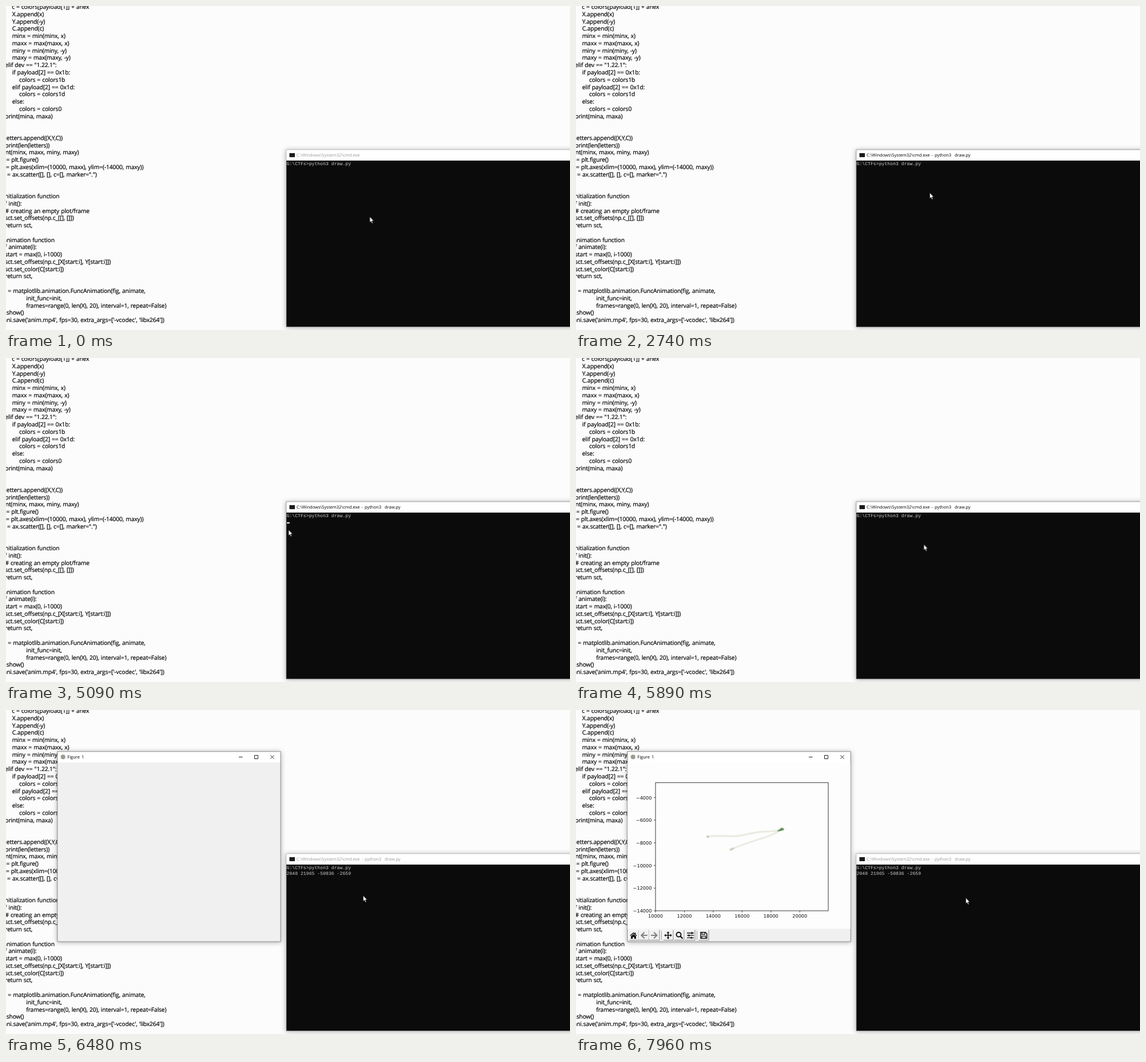
Recreate the animation shown at these times as an HTML page. Size 986x568 px, loop 8 s.

```html
<!DOCTYPE html>
<html lang="en">
<head>
<meta charset="utf-8">
<title>Terminal and plot</title>
<style>
html, body { margin: 0; width: 100%; height: 100%; overflow: hidden; background: #fcfcfd; }
body { position: relative; text-rendering: geometricPrecision; }
pre {
  position: absolute; left: -14px; top: -3.9px; margin: 0; color: #000;
  font: 10.3px/12.766px "Open Sans", "Noto Sans", sans-serif;
  letter-spacing: -.14px; word-spacing: .55px;
  -webkit-text-stroke: .2px #000;
}
svg { position: absolute; left: 0; top: 0; }
.bar { font: 7.55px "Open Sans", sans-serif; word-spacing: 1px; }
.con { font: 8.17px "Liberation Mono", monospace; fill: #ccc; }
.tick { font: 8.2px "DejaVu Sans", sans-serif; fill: #111; }
.win { filter: drop-shadow(0 1px 4px rgba(0, 0, 0, .32)); }
.line { fill: none; stroke: #222; }
.trail { fill: none; stroke: #ecebe3; stroke-width: 3.4; stroke-linecap: round; stroke-dasharray: 1 2; }

/* hard changes */
.step { animation: 8s step-end infinite; }
#frame { animation-name: frame; }
#title { animation-name: title; }
#suffix { animation-name: suffix; }
#caret { animation-name: caret; }
#output { animation-name: output; }
#figure { animation-name: figure; }
#plot { animation-name: plot; }
#arrow { animation-name: arrow; }
#beam { animation-name: beam; }
#tip { animation-name: tip; }
@keyframes frame { 0% { fill: #b4b4b4 } 9.125% { fill: #8a8a8a } 78.125%, 100% { fill: #b4b4b4 } }
@keyframes title { 0% { fill: #999 } 9.125% { fill: #000 } 78.125%, 100% { fill: #999 } }
@keyframes suffix { 0% { visibility: hidden } 26.375%, 100% { visibility: visible } }
@keyframes caret {
  0% { opacity: 0; transform: translate(603px, 279px) }
  9.125% { opacity: 1; transform: translate(603px, 279px) }
  15.75% { opacity: 0; transform: translate(603px, 279px) }
  22.625% { opacity: 1; transform: translate(603px, 279px) }
  26.375%, 35.625%, 48.875%, 62.625% { opacity: 1; transform: translate(490.5px, 288px) }
  29%, 42.25%, 55.5%, 69.25%, 100% { opacity: 0; transform: translate(490.5px, 288px) }
}
@keyframes output { 0% { opacity: 0 } 76.125%, 100% { opacity: 1 } }
@keyframes figure { 0% { opacity: 0 } 78.125%, 100% { opacity: 1 } }
@keyframes plot { 0% { opacity: 0 } 83.625%, 100% { opacity: 1 } }
@keyframes tip { 0% { opacity: 0 } 98.75%, 100% { opacity: 1 } }
@keyframes arrow { 0% { opacity: 1 } 47.2% { opacity: 0 } 63.2%, 100% { opacity: 1 } }
@keyframes beam { 0% { opacity: 0 } 47.2% { opacity: 1 } 63.2%, 100% { opacity: 0 } }

/* smooth motion */
#mouse { animation: mouse 8s linear infinite; }
#stroke1 { animation: stroke1 8s linear infinite; }
#stroke2 { animation: stroke2 8s linear infinite; }
#ink { animation: ink 8s linear infinite; }
@keyframes mouse {
  0%, 1.625% { transform: translate(636.5px, 370px) }
  11.625%, 32.125% { transform: translate(681px, 349px) }
  34.25% { transform: translate(619px, 328px) }
  36.875%, 39.5% { transform: translate(612px, 334px) }
  41.6% { transform: translate(638px, 371px) }
  49.5%, 51.7% { transform: translate(426px, 273.5px) }
  59%, 62.625% { transform: translate(484px, 297px) }
  72.625% { transform: translate(588px, 345px) }
  73.6% { transform: translate(608.5px, 327.5px) }
  80%, 82% { transform: translate(625px, 326px) }
  89%, 89.5% { transform: translate(618px, 283px) }
  93.625% { transform: translate(681px, 326px) }
  99.5%, 100% { transform: translate(682px, 330px) }
}
@keyframes stroke1 { 0%, 83.625% { stroke-dashoffset: 1 } 88%, 100% { stroke-dashoffset: 0 } }
@keyframes stroke2 { 0%, 89.5% { stroke-dashoffset: 1 } 98.75%, 100% { stroke-dashoffset: 0 } }
@keyframes ink { 0%, 87.5% { opacity: 0 } 88%, 100% { opacity: 1 } }
</style>
</head>
<body>
<pre>
        c = colors[payload[1]] + ahex
        X.append(x)
        Y.append(-y)
        C.append(c)
        minx = min(minx, x)
        maxx = max(maxx, x)
        miny = min(miny, -y)
        maxy = max(maxy, -y)
    elif dev == "1.22.1":
        if payload[2] == 0x1b:
            colors = colors1b
        elif payload[2] == 0x1d:
            colors = colors1d
        else:
            colors = colors0
    print(mina, maxa)


    letters.append((X,Y,C))
    print(len(letters))
print(minx, maxx, miny, maxy)
fig = plt.figure()
ax = plt.axes(xlim=(10000, maxx), ylim=(-14000, maxy))
sct = ax.scatter([], [], c=[], marker=".")


# initialization function
def init():
    # creating an empty plot/frame
    sct.set_offsets(np.c_[[], []])
    return sct,

# animation function
def animate(i):
    start = max(0, i-1000)
    sct.set_offsets(np.c_[X[start:i], Y[start:i]])
    sct.set_color(C[start:i])
    return sct,

ani = matplotlib.animation.FuncAnimation(fig, animate,
                init_func=init,
                frames=range(0, len(X), 20), interval=1, repeat=False)
plt.show()
# ani.save('anim.mp4', fps=30, extra_args=['-vcodec', 'libx264'])
</pre>
<svg width="986" height="568" viewBox="0 0 986 568">
  <!-- console -->
  <g class="win"><rect class="step" id="frame" x="489.5" y="251.5" width="520" height="311.5"/></g>
  <rect x="490.3" y="252.3" width="500" height="19" fill="#fff"/>
  <rect x="490.3" y="271" width="500" height="291.3" fill="#0b0b0b"/>
  <rect x="495.5" y="258" width="9.5" height="7" fill="#1a1a1a"/>
  <text class="bar step" id="title" x="508" y="264.2">C:\Windows\System32\cmd.exe<tspan class="step" id="suffix"> - python3&nbsp; draw.py</tspan></text>
  <g class="con">
    <text x="490.5" y="279">G:\CTFs&gt;python3 draw.py</text>
    <text class="step" id="output" x="490.5" y="288.6">2048 21965 -50836 -2659</text>
  </g>
  <rect class="step" id="caret" width="5" height="2" fill="#f2f2f2"/>

  <!-- figure window -->
  <g class="step" id="figure">
    <g class="win"><rect x="89.5" y="72.5" width="391" height="334" fill="#777"/></g>
    <rect x="90.3" y="73.3" width="389.4" height="19" fill="#fff"/>
    <rect x="90.3" y="92" width="389.4" height="313.7" fill="#f0f0f0"/>
    <circle cx="99.7" cy="82.3" r="4" fill="#9a9c8c"/>
    <text class="bar" x="107.3" y="85.2">Figure 1</text>
    <path class="line" d="M407 82.5h6.5M434.5 79.5h6v6h-6zM462.3 79.3l6.2 6.2m0-6.2l-6.2 6.2"/>
    <g class="step" id="plot">
      <rect x="90.3" y="92" width="389.4" height="291.5" fill="#fdfdfd"/>
      <path class="trail" id="stroke1" pathLength="1" d="M271 244.5C290 236 312 229 334 222Q348 217 360 209"/>
      <path class="trail" id="stroke2" pathLength="1" d="M360 209C350 214 338 212 320 214C302 216 292 221 276 221.3C260 221.5 245 219.5 230 222"/>
      <path d="M270.5 244.8l4-2" stroke="#d2d1c6" stroke-width="4" stroke-linecap="round"/>
      <g id="ink">
        <ellipse cx="360" cy="209" rx="4.3" ry="2.9" fill="#c3cba4"/>
        <ellipse cx="360" cy="209" rx="2.6" ry="1.8" fill="#3f7560"/>
      </g>
      <g class="step" id="tip">
        <circle cx="230.4" cy="222" r="2.3" fill="#cbcac2"/>
        <path d="M353.5 211.8L361 209" stroke="#8fb383" stroke-width="3.2" stroke-linecap="round"/>
        <path d="M356 211L361 209" stroke="#4a8558" stroke-width="2.4" stroke-linecap="round"/>
      </g>
      <rect class="line" x="139" y="127.3" width="302" height="224.7" stroke-width=".9"/>
      <g class="tick" id="ticks"></g>
      <g id="buttons"></g>
      <path d="M149.5 387v16M211.5 387v16" stroke="#aaa"/>
      <!-- toolbar icons -->
      <g fill="#111">
        <path d="M94.3 395.3l6.2-5.5 2.2 2v-1.6h1.6v3l2.3 2.1-.9 1-5.2-4.6-5.3 4.6z"/>
        <path d="M96 396.7l4.5-3.9 4.5 3.9v4.3h-3.3v-3h-2.4v3H96z"/>
        <path d="M161 388.2l2.6 3h-1.8v3h3v-1.8l3 2.6-3 2.6v-1.8h-3v3h1.8l-2.6 3-2.6-3h1.8v-3h-3v1.8l-3-2.6 3-2.6v1.8h3v-3h-1.8z"/>
      </g>
      <g fill="none" stroke="#808080" stroke-width="2.2">
        <path d="M124.8 395h-10M119.6 389.8l-5.2 5.2 5.2 5.2"/>
        <path d="M131 395h10M136.2 389.8l5.2 5.2-5.2 5.2"/>
      </g>
      <g fill="none" stroke="#111">
        <circle cx="179.5" cy="393.8" r="4" stroke-width="1.9"/>
        <path d="M182.5 396.8l4 4" stroke-width="2.3"/>
        <path d="M194 391h12M194 395.2h12M194 399.4h12" stroke-width="1.3"/>
        <path d="M202.5 389.3v3.4M197.5 393.5v3.4M201.5 397.7v3.4" stroke-width="2"/>
        <path d="M218 389.7h8.3l2.4 2.4v8.2H218z" stroke-width="1.5"/>
        <path d="M220.3 390v3.3h5V390M220 400v-3.6h6.6v3.6" stroke-width="1.2"/>
      </g>
    </g>
  </g>

  <!-- pointer -->
  <g id="mouse">
    <path class="step" id="arrow" fill="#fff" stroke="#111" stroke-width=".5" d="M-.4-.6V9.2L1.8 7.2 3.3 11 4.8 10.4 3.3 6.7H6.2z"/>
    <path class="step line" id="beam" d="M-2.2-4.8h1.6l.6.6.6-.6h1.6M0-4.2v8.4M-2.2 4.8h1.6l.6-.6.6.6h1.6" stroke-width=".9"/>
  </g>
</svg>
<script>
const byId = id => document.getElementById(id);

function add(parent, tag, attrs, text = '') {
  const el = document.createElementNS('http://www.w3.org/2000/svg', tag);
  for (const key in attrs) el.setAttribute(key, attrs[key]);
  el.textContent = text;
  parent.append(el);
}

const ticks = byId('ticks');
for (let i = 0; i < 6; i++) {
  const x = 139 + i * 50.45, y = 153.4 + i * 39.72;
  add(ticks, 'path', { d: `M${x} 352v3M139 ${y}h-3`, stroke: '#222', 'stroke-width': .8 });
  add(ticks, 'text', { x, y: 364.4, 'text-anchor': 'middle' }, 10000 + i * 2000);
  add(ticks, 'text', { x: 132.5, y: y + 3.1, 'text-anchor': 'end' }, '\u2212' + (4000 + i * 2000));
}

for (const x of [92, 110, 128, 152, 171, 190, 214]) {
  add(byId('buttons'), 'path', { d: `M${x + .5} 403.5v-18h17.5`, fill: 'none', stroke: '#fff' });
  add(byId('buttons'), 'path', { d: `M${x + .5} 403.5h17.5v-18`, fill: 'none', stroke: '#8a8a8a' });
}
</script>
</body>
</html>
```
